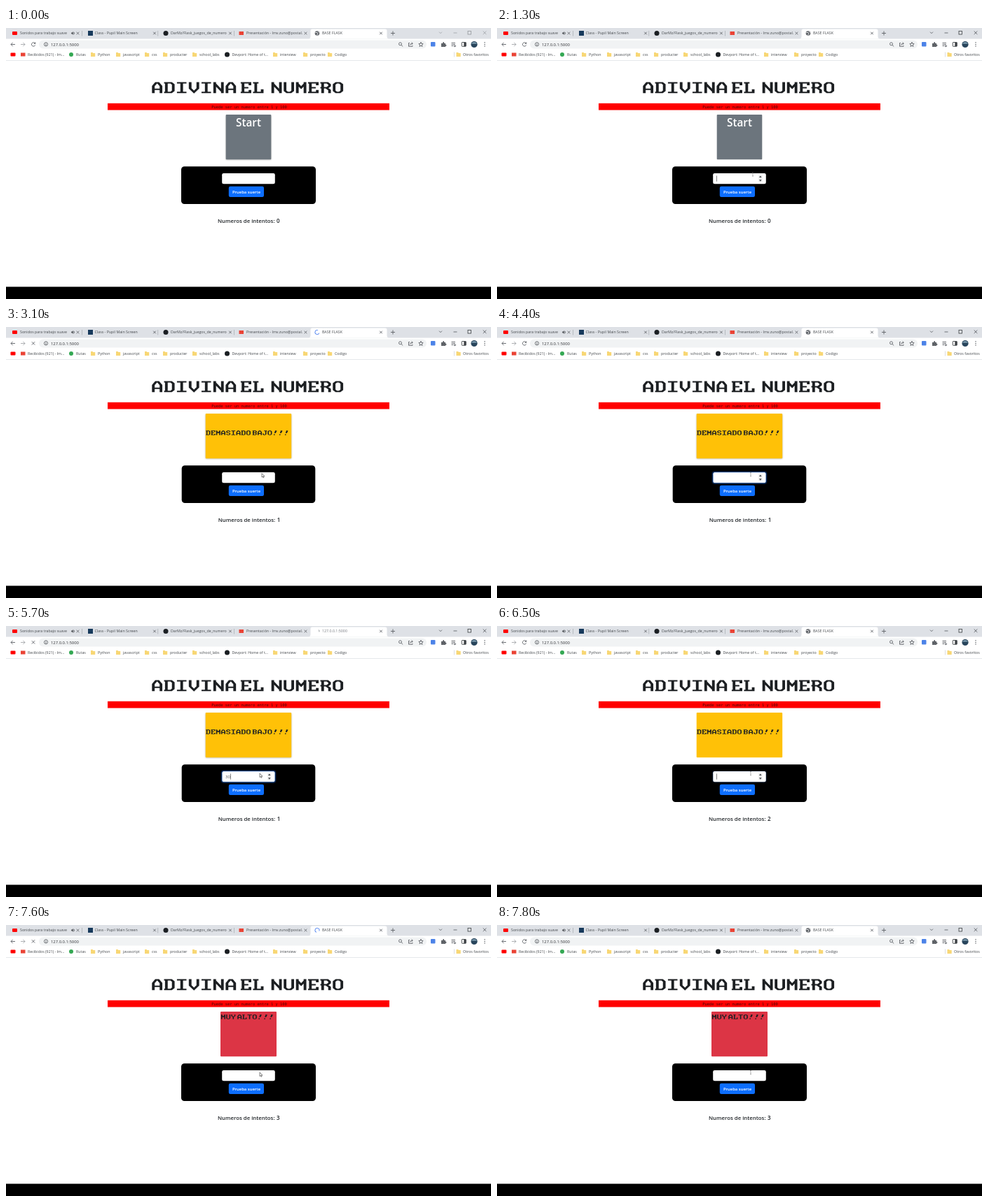
Recreate the animation shown at these times as an HTML page. Size 692 by 388 pixels, loop 8 s.

```html
<!DOCTYPE html>
<html lang="es">
<head>
<meta charset="utf-8">
<title>Adivina el numero</title>
<style>
html, body { margin: 0; width: 100%; height: 100%; overflow: hidden; background: #fff; }
svg { display: block; width: 692px; height: 388px; }
text { font-family: "Open Sans", "Noto Sans", sans-serif; white-space: pre; }
.ui { font-size: 5.3px; fill: #45494d; }
.ln { fill: none; stroke: #5f6368; stroke-width: .9; }
</style>
</head>
<body>
<svg id="stage" viewBox="0 0 692 388" xmlns="http://www.w3.org/2000/svg"></svg>
<script>
const stage = document.getElementById('stage');

// Slab pixel lettering: one stroke path per letter in a 3.5 x 7 cell
const stem = 'M.75 0V7';
const bowl = (a, b) => `M0 ${a}H2.3L3 ${a + 1}V${b - 1}L2.3 ${b}H0`;
const glyphs = {
  A: 'M.5 7V2.5L1.4 .5H2.1L3 2.5V7M.5 4.5H3',
  B: stem + bowl(.5, 3.5) + bowl(3.5, 6.5),
  D: stem + bowl(.5, 6.5),
  E: stem + 'M0 .5H3V2M.75 3.5H2.5M0 6.5H3V5',
  I: 'M.2 .5H3.3M1.75 0V7M.2 6.5H3.3',
  J: 'M1.2 .5H3.5M2.6 0V5.5L1.9 6.5H1L.5 5.5V4.5',
  L: 'M0 .5H1.8M.9 0V7M0 6.5H3V4.5',
  M: 'M.5 7V0M3 7V0M.5 1L1.75 3.5L3 1',
  N: 'M.5 7V0M3 7V0M.5 1L3 6',
  O: 'M1.2 .5H2.3L3 1.5V5.5L2.3 6.5H1.2L.5 5.5V1.5Z',
  R: stem + bowl(.5, 3.5) + 'M1.9 3.5L3 5V7',
  S: 'M3 2V1.5L2.3 .5H1.2L.5 1.5V2.5L1.2 3.5H2.3L3 4.5V5.5L2.3 6.5H1.2L.5 5.5V5',
  T: 'M0 .5H3.5M1.75 0V7',
  U: 'M.5 0V5.5L1.2 6.5H2.3L3 5.5V0',
  V: 'M.5 0V4L1.75 6.3L3 4V0',
  Y: 'M.5 0V2L1.75 3.7L3 2V0M1.75 3.5V7',
  '!': 'M3 0L2.1 3.6M2.4 0L1.8 4M1.4 5.5L1.2 7'
};

function pixelText(str, x, y, k) {
  let at = 0, out = '';
  for (const c of str) {
    if (c !== ' ') out += `<path transform="translate(${at})" d="${glyphs[c]}"/>`;
    at += c === ' ' ? .97 : c === '!' ? 4.45 : 4;
  }
  return `<g transform="translate(${x} ${y}) scale(${4.38 * k} ${2.28 * k})" fill="none" stroke="#1c1f22" stroke-width=".88">${out}</g>`;
}

const rect = (x, y, w, h, fill, r = 0, more = '') =>
  `<rect x="${x}" y="${y}" width="${w}" height="${h}" rx="${r}" fill="${fill}" ${more}/>`;
const dot = (x, y, r, fill) => `<circle cx="${x}" cy="${y}" r="${r}" fill="${fill}"/>`;
const line = (d, more = '') => `<path class="ln" d="${d}" ${more}/>`;
const ui = (x, y, s, more = '') => `<text class="ui" x="${x}" y="${y}" ${more}>${s}</text>`;
const cross = (x, y, r) => line(`M${x - r} ${y - r}L${x + r} ${y + r}M${x + r} ${y - r}L${x - r} ${y + r}`);
const folder = x => `<path fill="#f8d775" d="M${x - 3} 35h2.6l.8 1h2.8v5h-6.2z"/>`;

function tabs() {
  return rect(0, 0, 692, 15.5, '#dee1e6') +
    '<path fill="#fff" d="M431 15.5Q434.5 15.5 434.5 12V4Q434.5 1.5 437 1.5H541Q543.5 1.5 543.5 4V12Q543.5 15.5 547 15.5Z"/>' +
    [108, 216.5, 325].map(x => rect(x, 4, .6, 7.5, '#9aa0a6')).join('') +
    rect(9, 5, 7, 5, '#f00', 1) + ui(20, 9.4, 'Sonidos para trabajo suave') +
    '<path fill="#5f6368" d="M93 6.5h1.4l1.8-1.6v5.2l-1.8-1.6h-1.4z"/>' + line('M97 6q1.2 1.5 0 3', 'stroke-width=".6"') +
    rect(117, 4, 7, 7, '#173a5c') + ui(126.5, 9.4, 'Class - Pupil Main Screen') +
    dot(228, 7.5, 3.5, '#1b1f23') + ui(235, 9.4, 'DarMz/Flask_juegos_de_numero') +
    rect(332.5, 5, 6.5, 5, '#ea4335') + ui(343, 9.4, 'Presentación - lmv.zuno@postal.') +
    [102.5, 212, 320, 427.5, 535].map(x => cross(x, 7.5, 1.8)).join('') +
    line('M549 7.5H555M552 4.5V10.5');
}

function toolbar() {
  return line('M13 23.5H7M9.6 20.8L7 23.5L9.6 26.2') +
    line('M21 23.5H27M24.4 20.8L27 23.5L24.4 26.2', 'opacity=".55"') +
    rect(47, 17.5, 553, 12, '#f1f3f4', 6) +
    '<circle class="ln" cx="57" cy="23.4" r="2.6" stroke-width=".6"/>' + line('M57 23V25M57 21.8V22.4', 'stroke-width=".6"') +
    '<text x="64" y="25.5" font-size="5.9" fill="#303236">127.0.0.1:5000</text>' +
    '<circle class="ln" cx="562.5" cy="22.8" r="2"/>' + line('M564 24.4L566.2 26.5') +
    line('M576 21.5H574.5V26.3H580V25M576 24.8Q576.4 22.4 580 22.2M578.6 20.6L580.4 22.2L578.6 23.8', 'stroke-width=".7"') +
    line('M592 20.2L592.9 22.5L595.2 22.6L593.4 24.1L594 26.5L592 25.2L590 26.5L590.6 24.1L588.8 22.6L591.1 22.5Z', 'stroke-width=".7"') +
    rect(606, 20, 6.5, 6.5, '#4c83e8', 1) +
    '<path fill="#5f6368" d="M621 22h2q0-2 1.2-2t1.2 2h1.7v1.8q1.4.1 1.4 1.1t-1.4 1.1v1h-6.1z"/>' +
    line('M635.5 21.3H641M635.5 23.4H641M635.5 25.5H638.5') + '<path fill="#5f6368" d="M639.5 24.2l3 1.6-3 1.6z"/>' +
    rect(650.3, 20.5, 6, 5.8, 'none', .6, 'stroke="#3f4347" stroke-width=".9"') + rect(653.3, 20.5, 3, 5.8, '#3f4347') +
    dot(668, 23.5, 4.6, '#28455c') + '<path fill="#86a5b8" d="M664 22.5a4.6 4.6 0 0 1 8 0z"/>' +
    [20.7, 23.4, 26.1].map(y => dot(683, y, .75, '#5f6368')).join('');
}

function bookmarks() {
  const dirs = [[124, 'Python'], [160, 'javascript'], [201, 'css'], [227, 'producter'],
    [269, 'school_labs'], [384, 'interview'], [427, 'proyecto'], [462, 'Codigo']];
  return rect(6.5, 35.5, 7, 5, '#f00', 1) +
    rect(21, 35.5, 6.5, 5, '#ea4335') + ui(31, 39.9, 'Recibidos (921) - lm...') +
    dot(93, 38, 3, '#34a853') + ui(100, 39.9, 'Rutas') +
    dirs.map(([x, s]) => folder(x) + ui(x + 7, 39.9, s)).join('') +
    dot(315.5, 38, 3.5, '#1b1f23') + ui(322.5, 39.9, 'Devport: Home of t...') +
    rect(639, 34.5, .6, 7, '#c4c8cc') + folder(645.5) + ui(652, 39.9, 'Otros favoritos') +
    rect(0, 46, 692, .7, '#dcdfe3');
}

const card = (id, x, w, fill, inner) =>
  `<g id="${id}">` + rect(x, 124, w, 64.3, fill, 1) + inner + '</g>';

stage.innerHTML =
  '<defs><filter id="soft" x="-20%" y="-20%" width="140%" height="140%"><feGaussianBlur stdDeviation=".8"/></filter></defs>' +
  rect(0, 0, 692, 388, '#fff') + tabs() + toolbar() + bookmarks() +
  `<g id="controls" class="ln">${line('M618 5.7L620 7.7L622 5.7')}${line('M638.5 7H643.5')}` +
  rect(659, 4.5, 4.6, 4.6, 'none', 0, 'stroke="#3c4043" stroke-width=".8"') + cross(683, 6.8, 2.3) + '</g>' +
  '<g id="reload">' + line('M41.3 21.8A2.7 2.7 0 1 0 41.7 24.4') + '<path fill="#5f6368" d="M42.2 20v2.8h-2.8z"/></g>' +
  `<g id="stop">${cross(39, 23.4, 2.2)}</g>` +
  '<g id="globe">' + dot(444, 7.5, 3.3, '#5f6368') + line('M441.2 6.5H444L445 8.2L443.5 10.2M445 4.8L446.8 6.6', 'style="stroke:#fff;stroke-width:.8"') + '</g>' +
  '<path id="busy" fill="none" stroke="#4a7ff0" stroke-width=".9" d="M444 4.5A3 3 0 1 1 441 7.5"/>' +
  '<path id="wait" fill="none" stroke="#80868b" stroke-width=".8" d="M444 4.5A3 3 0 0 0 441.4 6"/>' +
  ui(451, 9.4, '', 'id="tabName"') +

  pixelText('ADIVINA EL  NUMERO', 208, 77.4, 1) +
  rect(145, 107.8, 402, 9.7, '#f00') +
  '<text x="347" y="114.7" text-anchor="middle" style="font:5.43px \'DejaVu Sans Mono\',monospace" fill="#4a0808">Puede ser un numero entre 1 y 100</text>' +
  rect(0, 125, 0, 63.8, '#000', 1, 'id="shade" filter="url(#soft)" opacity=".28"') +
  card('start', 313.7, 64.6, '#6c757d', '<text x="346" y="140.8" text-anchor="middle" font-size="15.3" font-weight="600" fill="#fff">Start</text>') +
  card('low', 284.7, 122.5, '#ffc107', pixelText('DEMASIADO BAJO!!!', 285.3, 148.3, .41)) +
  card('high', 306, 80, '#dc3545', pixelText('MUY ALTO!!!', 306.8, 128.3, .41)) +
  rect(250, 198.3, 192, 53.7, '#000', 4.5, 'id="box"') +
  rect(308.2, 208, 75.6, 15.3, '#fff', 2.3) +
  '<g id="ring">' + rect(307.4, 207.2, 77.2, 16.9, 'none', 3, 'stroke="#04204a" stroke-width="1.6"') +
  rect(308.4, 208.2, 75.2, 14.9, 'none', 2.2, 'stroke="#86b7fe" stroke-width=".5"') + '</g>' +
  '<text id="value" x="313" y="218" font-size="6" fill="#53585d"></text>' +
  rect(313, 211.5, .6, 8.2, '#333', 0, 'id="caret"') +
  '<g id="spin">' + rect(373, 210.8, 5.6, 9.8, '#efefef') + '<path fill="#44484c" d="M374 214l1.8-2.4 1.8 2.4zM374 217.3l1.8 2.4 1.8-2.4z"/></g>' +
  rect(317.8, 226.8, 50.2, 15.3, '#0d6efd', 2.3) +
  '<text x="343" y="236.6" text-anchor="middle" font-size="5.9" font-weight="600" fill="#fff">Prueba suerte</text>' +
  '<g id="score" fill="#212529" font-weight="600"><text x="302" y="279" font-size="7.8">Numeros de intentos:</text>' +
  '<text id="count" x="386" y="279" font-size="8"></text></g>' +
  '<g id="cursor"><path id="arrow" d="M0 0V5.6L1.3 4.4L2.2 6.3L3.1 5.9L2.2 4.1H4Z" fill="#fff" stroke="#333" stroke-width=".6"/>' +
  '<path id="beam" d="M-.9 -2.6H.9M0 -2.6V2.6M-.9 2.6H.9" fill="none" stroke="#777" stroke-width=".6"/></g>' +
  rect(0, 370.5, 692, 17.5, '#000');

const el = {};
stage.querySelectorAll('[id]').forEach(n => el[n.id] = n);
const show = (n, on) => n.setAttribute('visibility', on ? 'visible' : 'hidden');
const put = (n, s) => { if (n.textContent !== s) n.textContent = s; };
const set = (n, o) => { for (const k in o) n.setAttribute(k, o[k]); };
const part = (t, a, b) => Math.min(1, Math.max(0, (t - a) / (b - a)));
const ease = p => p * p * (3 - 2 * p);

// One entry per guess: hover, focus, two key presses, submit, answer, loaded
const rounds = [
  { hover: 1000, focus: 1300, keys: [2000, 2200], word: '20', send: 2700, reply: 3000, done: 3300 },
  { hover: 3600, focus: 3850, keys: [5000, 5200], word: '30', send: 5500, reply: 5800, done: 6100 },
  { hover: 6450, focus: 6450, keys: [7100, 7200], word: '50', send: 7400, reply: 7600, done: 7800 }
];

function draw(t) {
  const tries = rounds.filter(r => t >= r.reply).length;
  const load = rounds.find(r => t >= r.send && t < r.done);
  const r = rounds[tries];
  const waiting = load && t < load.reply;

  set(el.controls, { opacity: t < 600 ? .45 : 1 });
  show(el.reload, !load);
  show(el.stop, load);
  show(el.globe, !load);
  show(el.wait, waiting);
  show(el.busy, load && !waiting);
  set(el.wait, { transform: `rotate(${-(t * .36) % 360} 444 7.5)` });
  set(el.busy, { transform: `rotate(${(t * .5) % 360} 444 7.5)` });
  put(el.tabName, waiting ? '127.0.0.1:5000' : 'BASE FLASK');
  el.tabName.style.fill = waiting ? '#777b80' : '#45494d';

  show(el.start, tries === 0);
  show(el.low, tries === 1 || tries === 2);
  show(el.high, tries === 3);
  show(el.shade, t < 100 || tries === 1);
  set(el.shade, tries ? { x: 284.7, width: 122.5 } : { x: 313.7, width: 64.6 });

  const inset = tries === 1 ? .7 : 0;
  set(el.box, { x: 250 + inset, width: 192 - 2 * inset });
  set(el.score, { transform: `translate(${inset})` });
  put(el.count, String(tries));

  const typed = r ? r.keys.filter(k => t >= k).length : 0;
  const focused = r && t >= r.focus;
  put(el.value, r ? r.word.slice(0, typed) : '');
  show(el.spin, r && t >= r.hover);
  set(el.ring, { opacity: focused ? ease(part(t, r.focus, r.focus + 150)) : 0 });
  let blink = false;
  if (focused) {
    const since = Math.min(t, r.send) - (typed ? r.keys[typed - 1] : r.focus);
    blink = since % 1000 < 500;
  }
  show(el.caret, blink);
  set(el.caret, { x: 313.2 + typed * 3.43 });

  const enter = ease(part(t, 800, 1100)), slide = ease(part(t, 3600, 3800));
  const x = 385 - 20 * enter - 3 * slide;
  const y = 192 + 17.5 * enter + 1.5 * slide;
  show(el.cursor, t >= 800);
  set(el.cursor, { transform: `translate(${x} ${y})` });
  const pointer = t < 1000 || load;
  el.arrow.style.display = pointer ? '' : 'none';
  el.beam.style.display = pointer ? 'none' : '';
}

const begin = performance.now();
function tick(now) {
  draw(Math.max(0, now - begin) % 8000);
  requestAnimationFrame(tick);
}
draw(0);
requestAnimationFrame(tick);
</script>
</body>
</html>
```
